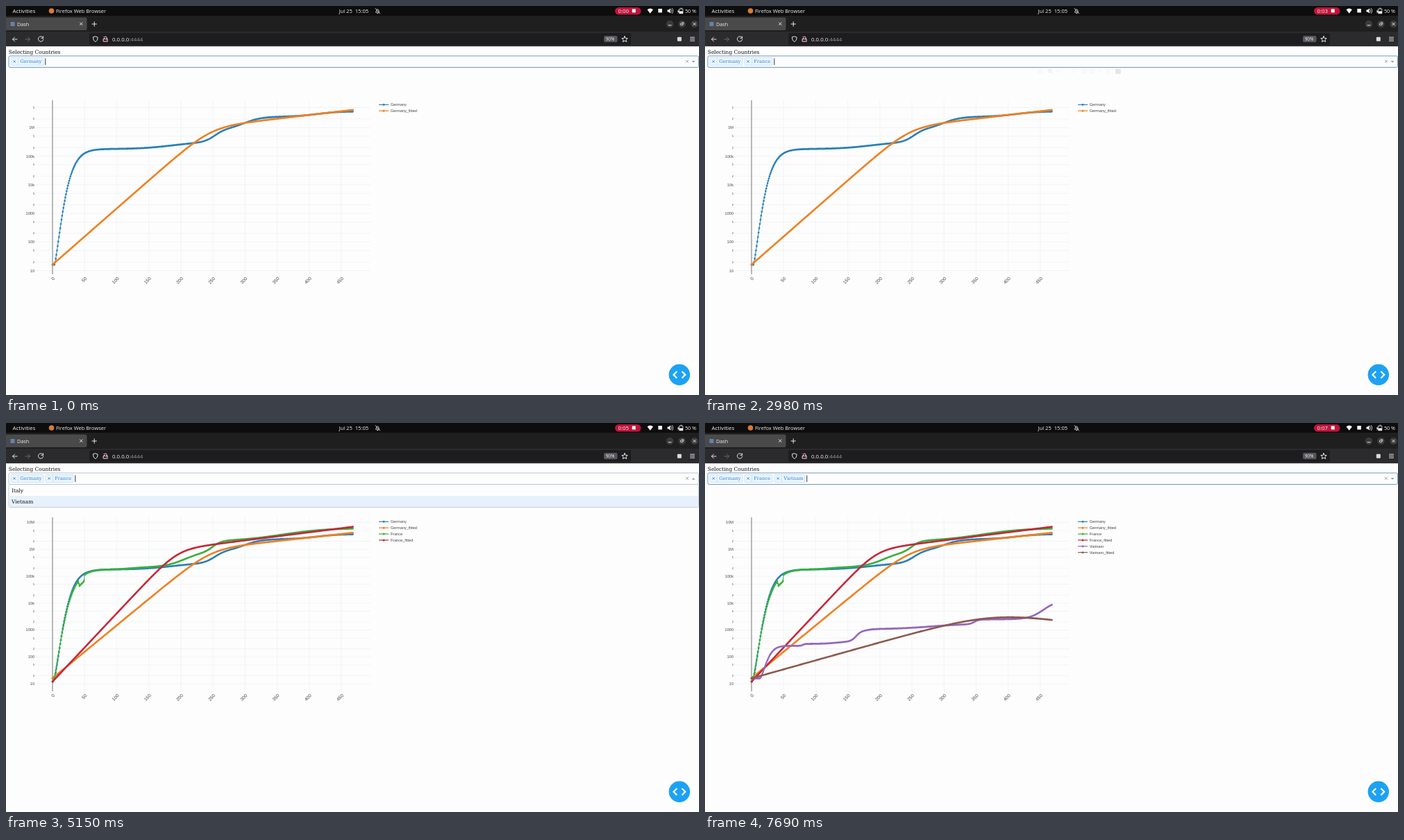
Recreate the animation shown at these times as an HTML page. Size 998 by 561 pixels, loop 8 s.

```html
<!DOCTYPE html>
<html lang="en">
<head>
<meta charset="utf-8">
<title>Dash</title>
<style>
html, body { margin: 0; width: 100%; height: 100%; overflow: hidden; background: #fdfdfd; }
svg { display: block; width: 100vw; height: 100vh; }
.ui { font-family: "Open Sans", "Noto Sans", sans-serif; fill: #f2f2f2; }
.page { font: 7.45px "DejaVu Serif", serif; fill: #111; }
.plot { font: 5.6px "Liberation Sans", Arial, sans-serif; fill: #444; }
.icon { fill: none; stroke: #e6e6e6; stroke-width: 1; stroke-linecap: round; stroke-linejoin: round; }
</style>
</head>
<body>
<svg id="stage" viewBox="0 0 998 561"></svg>
<script>
const LOOP = 8000;
const X0 = 67, PER_DAY = 0.924, DAYS = 468;
const wide = { base: 381.5, step: 41.25, top: 6 };
const tall = { base: 376, step: 38.77, top: 7 };

// All curves give log10(cases) for a day.
// Counted cases: a first outbreak, then waves of [height, middle day, width].
const outbreak = (from, height, start, tau, power, waves) => day => {
  const first = 1 - Math.exp(-((Math.max(0, day - start) / tau) ** power));
  return waves.reduce((sum, [h, mid, w]) => sum + h / (1 + Math.exp((mid - day) / w)), from + height * first);
};
// Fitted model: straight growth that bends softly into a line ending at `end`.
const fitted = (from, growth, end, late, soft) => day => {
  const a = from + growth * day, b = end - late * (DAYS - day);
  return -soft * Math.log(Math.exp(-a / soft) + Math.exp(-b / soft));
};

const traces = [
  ["Germany", "#2b80b8", outbreak(1.206, 4.04, 3, 18.9, 1.31,
    [[.25, 185, 25], [.46, 253, 8.5], [.42, 300, 13], [.19, 412, 18]])],
  ["Germany_fitted", "#f08020", fitted(1.206, .01963, 6.615, .0026, .32)],
  ["France", "#38b03c", outbreak(1.077, 4.17, 1, 21.3, 1.345,
    [[-.24, 41, .15], [.24, 49.3, .15], [.08, 120, 12], [.6, 206, 16], [.38, 250, 6.5], [.48, 358, 34]])],
  ["France_fitted", "#c4283a", fitted(1.077, .02538, 6.837, .003, .32)],
  ["Vietnam", "#9467bd", outbreak(1.2, 1.21, 13, 13.5, 1.5,
    [[.07, 80, 1.5], [.1, 135, 12], [.38, 163, 4], [.07, 180, 6], [.2, 280, 28], [.17, 347, 3.5], [.7, 455, 11]])],
  ["Vietnam_fitted", "#8c5a50", fitted(1.2, .0067, 3.41, -.0035, .4)],
];

const text = (x, y, s, extra = "") => `<text x="${x}" y="${y}" ${extra}>${s}</text>`;
const size = n => `font-size="${n}"`;
const path = (d, extra = "") => `<path d="${d}" ${extra}/>`;
const rect = (x, y, w, h, fill, extra = "") =>
  `<rect x="${x}" y="${y}" width="${w}" height="${h}" fill="${fill}" ${extra}/>`;
const circle = (x, y, r, fill, extra = "") => `<circle cx="${x}" cy="${y}" r="${r}" fill="${fill}" ${extra}/>`;
const cross = (x, y, r) => `M${x - r} ${y - r}l${2 * r} ${2 * r}m0 ${-2 * r}l${-2 * r} ${2 * r}`;
const group = (id, body, extra = "") => `<g id="${id}" ${extra}>${body}</g>`;

function trace([, color, f], { base, step }) {
  let line = "", dots = "";
  for (let d = 0; d <= DAYS; d++) {
    const p = (X0 + d * PER_DAY).toFixed(2) + " " + (base - (f(d) - 1) * step).toFixed(2);
    line += (d ? "L" : "M") + p;
    dots += "M" + p + "h0";
  }
  const stroke = `fill="none" stroke="${color}" stroke-linecap="round"`;
  return path(line, stroke + ' stroke-width="1"') + path(dots, stroke + ' stroke-width="2.8"');
}

function axes({ base, step, top }) {
  let grid = "", labels = "";
  const names = ["10", "100", "1000", "10k", "100k", "1M", "10M"];
  for (let e = 0; e < top; e++) {
    for (const m of [1, 2, 5]) {
      const y = base - (e + Math.log10(m)) * step;
      if (y < 137) continue;
      grid += `M42 ${y}H525`;
      labels += m === 1 ? text(41, y + 2, names[e], 'text-anchor="end"')
        : text(41, y + 1.5, m, 'text-anchor="end" font-size="4.2"');
    }
  }
  for (let d = 0; d <= 450; d += 50) {
    const x = X0 + d * PER_DAY;
    grid += `M${x} 136V387`;
    labels += text(0, 0, d, `text-anchor="end" font-size="6.6" transform="translate(${x + 3.7} 393.5) rotate(-45)"`);
  }
  return path(grid, 'stroke="#eef1f5" stroke-width=".8"') + path("M67 136V387", 'stroke="#777"') + labels;
}

const legend = ([name, color], i) => {
  const y = 142.3 + i * 8.87;
  return path(`M537 ${y}h14`, `stroke="${color}" stroke-width="1.2"`) + circle(544, y, 1.5, color)
    + text(553.7, y + 2, name);
};
const plot = (id, from, to, scale) =>
  group(id, traces.slice(from, to).map((t, i) => trace(t, scale) + legend(t, i + from)).join(""));

function tag(name, x, w) {
  const blue = "#2f86d0";
  return rect(x, 74.5, w, 11, "#ebf5ff", 'rx="1" stroke="#c2dff5" stroke-width=".8"')
    + path(`M${x + 10.5} 74.5v11`, 'stroke="#c2dff5" stroke-width=".8"')
    + path(cross(x + 5.2, 80, 1.6), `stroke="${blue}" stroke-width=".9"`)
    + text(x + 13.2, 82.4, name, `font-size="6.75" fill="${blue}"`);
}

function menu(id, names) {
  const h = names.length * 16.1 + 1;
  return group(id, rect(4, 88.5, 993.5, h, "#fdfdfd", 'rx="2" stroke="#b8c6d2" stroke-width=".9"')
    + rect(4.5, 89, 992.5, 16, "#e7f1fb", 'class="hot"')
    + names.map((n, i) => text(8, 99.6 + i * 16.1, n)).join(""));
}

function browser() {
  const bar = rect(0, 0, 998, 14, "#0d0d0d") + rect(0, 14, 998, 23.5, "#1f1f20") + rect(0, 37, 998, 21.2, "#2b2b2d")
    + rect(-4, 16.5, 120.5, 18.5, "#4a4a4b", 'rx="2.5"')
    + rect(120, 39, 780, 17.3, "#1d1d20", 'rx="2.5"')
    + rect(861, 43, 19.5, 9.3, "#56565c", 'rx="2"')
    + rect(877, 2, 37.5, 10.5, "#c0143c", 'rx="5.2"') + rect(901.7, 4.4, 5, 5, "#fff")
    + circle(65.5, 7, 3.8, "#d9793a") + rect(6.5, 23, 6, 6, "#6680b0");
  const words = text(9.5, 9.8, "Activities", size(8)) + text(72, 9.8, "Firefox Web Browser", size(7.5))
    + text(479.5, 9.8, "Jul 25\u00a0\u00a015:05", size(7.6)) + text(881.5, 9.8, "0:00", size(7.8) + ' id="clock"')
    + text(978, 9.8, "50 %", size(7.2)) + text(16, 28.5, "Dash", size(7.2))
    + text(153, 50.6, '0.0.0.0<tspan fill="#99999f">:4444</tspan>', size(7.85))
    + text(863.7, 50, "90%", size(6.4));
  const buttons = [956, 973.5, 991.5].map(x => circle(x, 26, 5.3, "#3b3b3b")).join("");
  const icons = path(cross(108.3, 25.7, 1.8) + "M124 26h6.4M127.2 22.8v6.4"
    + "M954 27.8h4" + cross(991.5, 26, 1.8)
    + "M16 48H9.5m3-3l-3 3 3 3" + "M53 45.2a3.7 3.7 0 1 0 .8 3M53.6 44v2.6h-2.6"
    + "M128.8 44l3.4 1.2q.2 4.5-3.4 6.6q-3.6-2.1-3.4-6.6z"
    + "M141.5 47.5v-1.6a1.8 1.8 0 0 1 3.6 0v1.6M140.5 47.5h5.6v3.6h-5.6z"
    + "M891 43.6l1.2 2.8 3 .3-2.3 2 .7 3-2.6-1.6-2.6 1.6.7-3-2.3-2 3-.3z"
    + "M985.5 45.2h6M985.5 47.7h6M985.5 50.2h6")
    + path("M532.5 9h5.2q-1-1-1-3a1.7 1.7 0 0 0-3.2 0q0 2-1 3M534.4 10.5h1.5M532 3.5l6.5 7.5"
      + "M972 25h2.6v2.6h-2.6zM973.3 23.8h2.5v2.5M970 4.2h4.8v6.6h-4.8zM971.5 3.2h1.8", 'stroke-width=".8"')
    + path("M28 48h6.5m-3-3l3 3-3 3", 'stroke="#6b6b6b"')
    + path("M140 44l6.5 7.5", 'stroke="#e0355a"')
    + path("M957.5 4.3a4 4 0 0 1 0 5.4M959.3 3.3a6 6 0 0 1 0 7.4", 'stroke-width=".8"');
  const solid = path("M923.5 5.3q4.2-3.6 8.4 0L927.7 10.8z M952.5 5.6h1.8l2.2-2v6.8l-2.2-2h-1.8z"
    + "M970 7.5h4.8v3.3h-4.8z M968.6 5l-1.8 3h1.2l-.6 3 2.4-3.6h-1.4z", 'fill="#fff"');
  return group("browser", bar + words + buttons + group("icons", icons, 'class="icon"') + solid
    + rect(939.3, 4, 5.5, 5.5, "#fff") + rect(966.8, 44.8, 6, 6, "#dcdcdc", 'rx="1"'), 'class="ui"');
}

function modebar() {
  const light = "#c6c6c6";
  const solid = path("M479 92h2l.8-1h1.8l.8 1h2v5h-7.4zM543 91h7v6.5h-7zM554 91h7v6.5h-7z"
    + "M576 94.2l3.5-3.2 3.5 3.2h-1v3h-1.8v-2h-1.4v2h-1.8v-3z", `fill="${light}"`)
    + circle(482.7, 94.4, 1.3, "#fdfdfd") + path("M544.5 94.2h4M546.5 92.2v4M555.5 94.2h4", 'stroke="#fdfdfd"');
  const lines = path("M505.2 94h7M508.7 90.5v7M507.7 91.5l1-1 1 1M507.7 96.5l1 1 1-1M506.2 93l-1 1 1 1M511.2 93l1 1-1 1"
    + "M565.5 91l6 6M571.5 91l-6 6M528.6 95.6q-1.5-4 2.6-4.6 4.4-.2 3.4 2.6-1 2-5 1.7 -.7 1 .5 2")
    + rect(516.7, 91, 6.5, 6.3, "none", 'stroke-dasharray="1 1"');
  const zoom = circle(496.7, 93.3, 2.4, "none") + path("M498.6 95.2l2 2M495.5 93.3h2.4M496.7 92.1v2.4");
  return group("modebar", solid + `<g fill="none" stroke="${light}" stroke-width=".9">${lines}</g>`
    + `<g fill="none" stroke="#666" stroke-width="1.1">${zoom}</g>` + rect(591, 90.3, 7.8, 7.6, "#26262a"));
}

stage.innerHTML = rect(0, 0, 998, 561, "#fdfdfd")
  + `<g class="plot">`
  + group("one", axes(wide) + plot("g1", 0, 2, wide))
  + group("more", axes(tall) + plot("g2", 0, 4, tall) + plot("vn", 4, 6, tall))
  + "</g>" + modebar()
  + `<g class="page">` + text(3.8, 69.2, "Selecting Countries")
  + menu("menu1", ["Italy", "France", "Vietnam"]) + menu("menu2", ["Italy", "Vietnam"])
  + rect(4, 72, 993.5, 16.5, "#fdfdfd", 'rx="2" id="box"')
  + tag("Germany", 7, 47) + group("tag2", tag("France", 57, 40)) + group("tag3", tag("Vietnam", 100, 43.5))
  + rect(0, 75.5, 0.9, 9.5, "#222", 'id="caret"')
  + path(cross(981, 79.8, 2), 'stroke="#999" stroke-width=".9"')
  + path("M987.6 79.2h4.8l-2.4 2.4z", 'fill="#888" id="down"') + path("M987.6 81.6h4.8l-2.4-2.4z", 'fill="#888" id="up"')
  + "</g>" + browser()
  + circle(969.8, 531.7, 15.2, "#1ca2f4")
  + path("M966.2 527l-4.8 4.8 4.8 4.8M973.4 527l4.8 4.8-4.8 4.8", 'fill="none" stroke="#fff" stroke-width="2.2"');

const el = id => document.getElementById(id);
const show = (id, on) => el(id).style.display = on ? "" : "none";
const within = (t, a, b) => t >= a && t < b;
const ramp = (t, start, ms = 300) => Math.min(1, Math.max(0, (t - start) / ms));
const ticks = [880, 1890, 2890, 3900, 5150, 5890, 6830];
const hovers = [[200, 1000], [2950, 3850], [5950, 6975]];
const caretOff = [[1300, 2300], [4200, 5150], [6350, 7650]];

function frame(now) {
  const t = now % LOOP;
  const open1 = within(t, 1590, 2920), open2 = within(t, 4500, 5900), open = open1 || open2;
  show("menu1", open1);
  show("menu2", open2);
  el("menu1").querySelector(".hot").setAttribute("y", t < 2160 ? 89 : 105);
  el("menu2").querySelector(".hot").setAttribute("y", t < 4900 ? 89 : 105);
  el("box").setAttribute("stroke", open ? "#b8c6d2" : "#6f9cc0");
  show("up", open);
  show("down", !open);
  show("tag2", t >= 2920);
  show("tag3", t >= 5900);
  show("one", t < 3300);
  show("more", t >= 3300);
  show("vn", t >= 6300);
  show("caret", !caretOff.some(([a, b]) => within(t, a, b)));
  el("caret").setAttribute("x", t < 2920 ? 56.3 : t < 5900 ? 99.4 : 146.3);
  el("modebar").style.opacity = hovers.reduce((sum, [a, b]) => sum + ramp(t, a) - ramp(t, b), 0);
  el("clock").textContent = "0:0" + ticks.filter(s => t >= s).length;
  requestAnimationFrame(frame);
}
requestAnimationFrame(frame);
</script>
</body>
</html>
```
